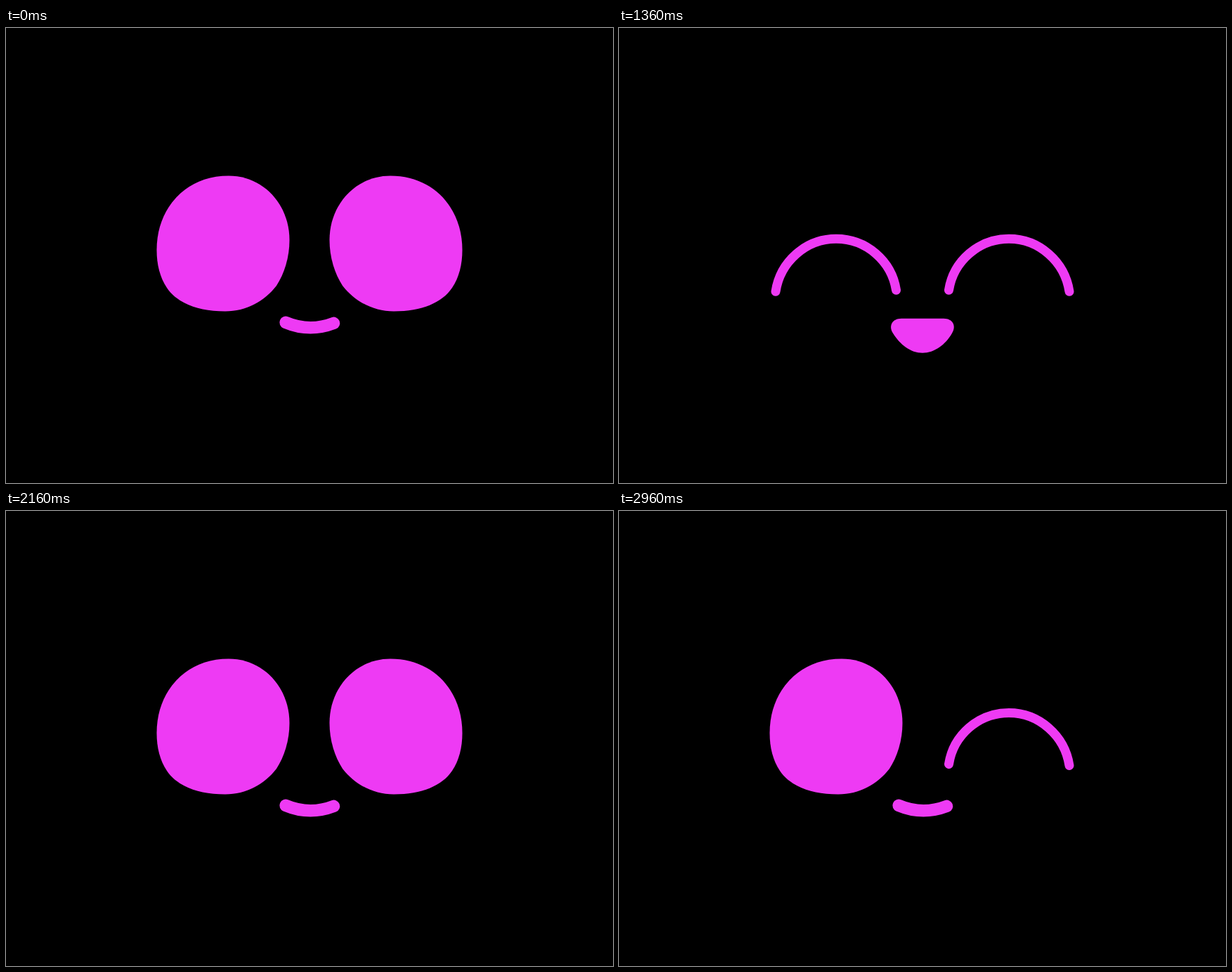
Recreate the animation shown at these times as an HTML page. Size 864x648 px, loop 3040 ms.

```html
<!DOCTYPE html>
<html lang="en">
<head>
<meta charset="utf-8">
<title>Face</title>
<style>
  html, body { margin: 0; width: 100%; height: 100%; overflow: hidden; background: #000; }
  svg { display: block; width: 100%; height: 100%; fill: #ee3af4; }
  .line { fill: none; stroke: #ee3af4; stroke-linecap: round; }
</style>
</head>
<body>
<svg viewBox="0 0 864 648">
  <defs>
    <path id="open" d="M317 210.5C366 210.5 403.5 251 403.5 302C403.5 327 396 350 385 367C368 389 342 403.5 312 403.5C272 403.5 243 391 229 370C219 355 214.5 337 214.5 316C214.5 258 254 210.5 317 210.5Z"/>
    <path id="arc" class="line" stroke-width="13" d="M223 362.5C229.5 320 266 287.5 309 287.5C352 287.5 388 319 394.5 360.5"/>
  </defs>
  <g id="face">
    <use id="leftOpen" href="#open"/>
    <use id="leftArc" href="#arc"/>
    <g transform="translate(864) scale(-1 1)">
      <use id="rightOpen" href="#open"/>
      <use id="rightArc" href="#arc"/>
    </g>
    <path id="smile" class="line" stroke-width="17.5" d="M398.1 419.4Q432 433.7 466.5 420.4"/>
    <path id="laugh" d="M402 401H462C475.5 401 480.5 412 474 422C465 438 449 450 432 450C415 450 400 438 390 422C383.5 412 388.5 401 402 401Z"/>
  </g>
</svg>
<script>
  const LOOP = 3040, STEP = 80;

  // [time in ms, value]
  const bob = [[800, 0], [1040, 17], [1240, 19.1], [1600, -5], [2080, 0]];
  const tilt = [[2410, 0], [2730, 5], [2960, 0]];

  const $ = id => document.getElementById(id);
  const show = (id, on) => $(id).style.display = on ? '' : 'none';
  const within = (t, from, to) => t >= from && t < to;
  const ease = p => p * p * (3 - 2 * p);

  function valueAt(keys, t) {
    const i = keys.findIndex(k => k[0] > t);
    if (i < 0) return keys[keys.length - 1][1];
    if (i === 0) return keys[0][1];
    const [t0, a] = keys[i - 1], [t1, b] = keys[i];
    return a + (b - a) * ease((t - t0) / (t1 - t0));
  }

  function setEye(side, closed) {
    show(side + 'Open', !closed);
    show(side + 'Arc', closed);
  }

  function draw(now) {
    const t = Math.floor(now % LOOP / STEP) * STEP;
    const happy = within(t, 960, 2160);
    const laughing = within(t, 960, 1600);
    setEye('left', happy);
    setEye('right', happy || t >= 2480);
    show('laugh', laughing);
    show('smile', !laughing);
    $('face').setAttribute('transform',
      `translate(0 ${valueAt(bob, t)}) rotate(${valueAt(tilt, t)} 432 324)`);
  }

  const start = performance.now();
  function tick() {
    draw(performance.now() - start);
    requestAnimationFrame(tick);
  }
  tick();
</script>
</body>
</html>
```
